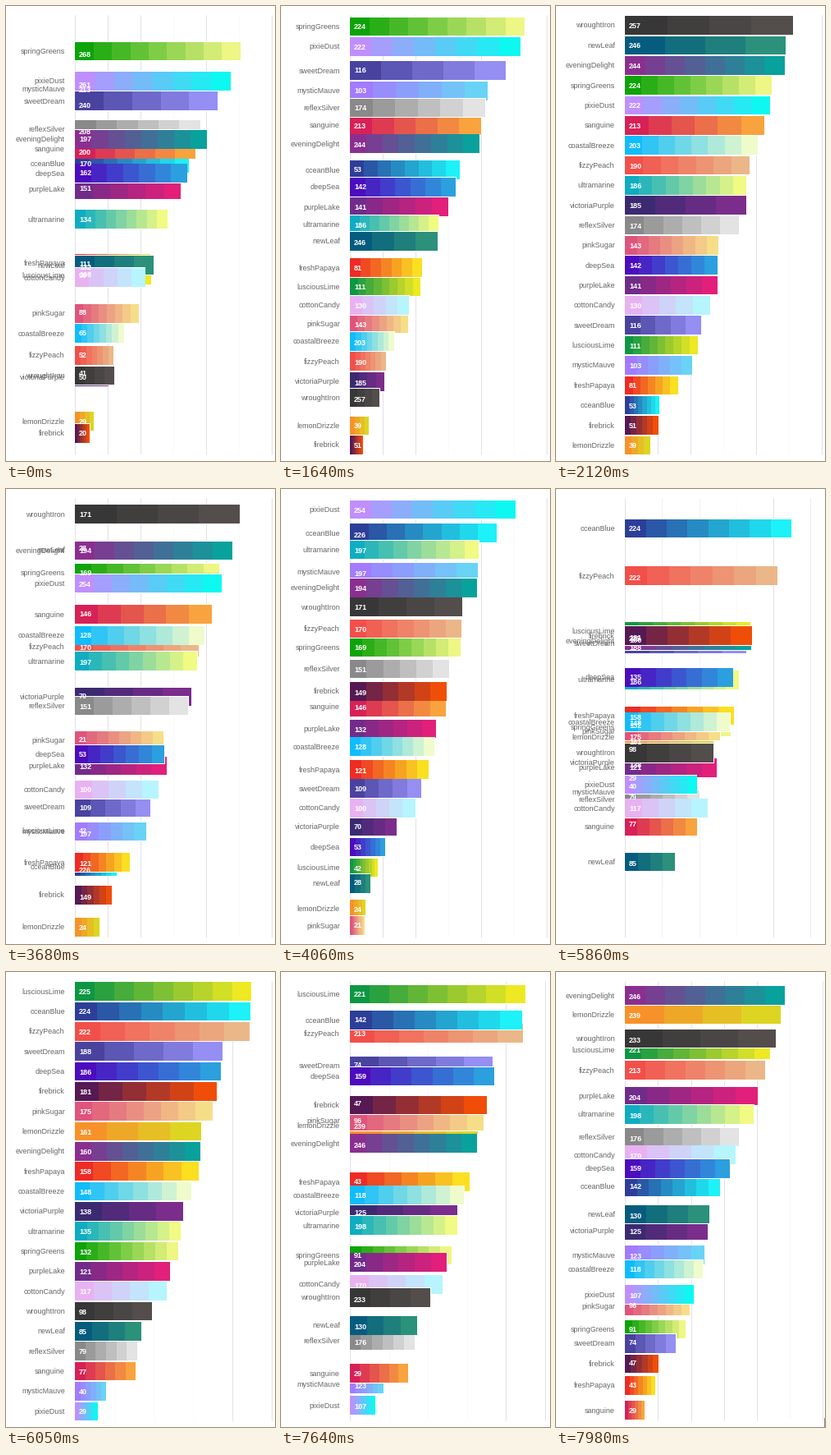
Animation, 328 px wide and 554 px high, one loop 8 s. Source, as a matplotlib script:

```python
import matplotlib.pyplot as plt
import numpy as np
from matplotlib.animation import FuncAnimation
from matplotlib.collections import LineCollection, PolyCollection
from matplotlib.colors import to_rgb

W, H, DPI = 328, 554, 64
PX = 72 / DPI                      # points per pixel
LOOP, TICK = 8000, 20
X0, SPAN = 84, 239.4               # left edge and width of the plot
ROW0, STEP, BAR = 23.5, 24.35, 22.6
EASE_MS, TEXT_LAG = 480, 5

# name: (start colour, end colour, bands, value in each round), back to front
BARS = {
    "victoriaPurple": ("#312a6c", "#852d91", 4, (70, 50, 185, 70, 138, 125)),
    "lemonDrizzle": ("#fb872b", "#d9e021", 4, (33, 29, 39, 24, 161, 239)),
    "springGreens": ("#009e00", "#fcfb8d", 9, (115, 268, 224, 169, 132, 91)),
    "pinkSugar": ("#dd4a7b", "#f8e88a", 8, (183, 88, 143, 21, 175, 96)),
    "lusciousLime": ("#009245", "#fcee21", 9, (195, 108, 111, 42, 225, 221)),
    "fizzyPeach": ("#f24645", "#ebc08d", 7, (126, 52, 190, 170, 222, 213)),
    "oceanBlue": ("#2e3192", "#1bffff", 8, (212, 170, 53, 226, 224, 142)),
    "mysticMauve": ("#a872ff", "#63dcf5", 6, (225, 213, 103, 197, 40, 123)),
    "freshPapaya": ("#ed1c24", "#fcee21", 7, (150, 111, 81, 121, 158, 43)),
    "sanguine": ("#d4145a", "#fbb03b", 6, (35, 200, 213, 146, 77, 29)),
    "reflexSilver": ("#808080", "#ececec", 6, (40, 208, 174, 151, 79, 176)),
    "purpleLake": ("#662d8c", "#ed1e79", 6, (262, 151, 141, 132, 121, 204)),
    "coastalBreeze": ("#00b7ff", "#ffffc7", 8, (171, 65, 203, 128, 148, 118)),
    "ultramarine": ("#00a8c5", "#ffff7e", 9, (206, 134, 186, 197, 135, 198)),
    "pixieDust": ("#cc88ff", "#00fff0", 8, (28, 261, 222, 254, 29, 107)),
    "sweetDream": ("#3f3a94", "#9f97fe", 5, (22, 240, 116, 109, 188, 74)),
    "newLeaf": ("#00537e", "#319a7a", 4, (18, 132, 246, 28, 85, 130)),
    "eveningDelight": ("#93278f", "#00a99d", 8, (245, 197, 244, 194, 160, 246)),
    "cottonCandy": ("#eeaaf0", "#b0fdff", 5, (265, 90, 130, 100, 117, 170)),
    "deepSea": ("#4f00bc", "#29abe2", 7, (255, 162, 142, 53, 186, 159)),
    "wroughtIron": ("#333333", "#585150", 4, (237, 41, 257, 171, 98, 233)),
    "firebrick": ("#45145a", "#ff5300", 6, (52, 20, 51, 149, 181, 47)),
}
COUNT = len(BARS)

# each change of round: first step, last step, number of steps, start of easing
CHANGES = [
    (0, 120, 3, -373),
    (1640, 2120, 10, 1592),
    (3680, 4140, 10, 3597),
    (5600, 6040, 10, 5563),
    (7580, 7980, 9, 7555),
]

values = np.array([bar[3] for bar in BARS.values()]).T
rows = np.argsort(np.argsort(-values, axis=1), axis=1)
centres = ROW0 + STEP * rows
scales = SPAN / np.array([300, 300, 300, 300, 250, 300])
widths = values * scales[:, None]

ticks = np.arange(0, 301, 50)
pale = 0.15
early = (1, 1, 1, pale, 1, pale, 1)
tick_alpha = np.array([early] * 4 + [(1, pale, pale, pale, 1, 1, 0),
                                     (1, 1, 1, 1, 1, pale, 1)])


def ease(u):
    u = min(max(u, 0), 1)
    return 2 * u * u if u < 0.5 else 1 - 2 * (1 - u) ** 2


def mix(table, k, p):
    return table[k] * (1 - p) + table[k + 1] * p


def progress(ms):
    """Index of the current change, and its eased part for bars and numbers."""
    k = max(i for i, change in enumerate(CHANGES) if ms >= change[0])
    first, last, steps, start = CHANGES[k]
    gap = (last - first) / (steps - 1)
    step = min(int((ms - first) / gap + 1e-6), steps - 1)
    spent = first + step * gap - start
    return k, ease(spent / EASE_MS), ease((spent - TEXT_LAG) / EASE_MS)


def box(left, right, top, bottom):
    return [(left, top), (right, top), (right, bottom), (left, bottom)]


def bar_boxes(width, y):
    boxes = []
    half = BAR / 2
    for (_, _, bands, _), w, c in zip(BARS.values(), width, y):
        boxes.append(box(X0, X0 + w + 0.8, c - half - 0.8, c + half + 0.8))
        edges = X0 + 0.4 + (w - 0.4) * np.arange(bands + 1) / bands
        for i in range(bands):
            right = min(edges[i + 1] + 0.5, edges[-1])
            boxes.append(box(edges[i], right, c - half, c + half))
    return np.array(boxes)


def bar_colours():
    colours = []
    for start, end, bands, _ in BARS.values():
        a, b = np.array(to_rgb(start)), np.array(to_rgb(end))
        colours.append((1, 1, 1))
        colours += [tuple(a + (b - a) * (i + 0.5) / bands) for i in range(bands)]
    return colours


fig = plt.figure(figsize=(W / DPI, H / DPI), dpi=DPI, facecolor="white")
ax = fig.add_axes([0, 0, 1, 1])
ax.set_xlim(0, W)
ax.set_ylim(H, 0)
ax.axis("off")

grid = LineCollection([], linewidths=PX, zorder=1)
ax.add_collection(grid, autolim=False)
bars = PolyCollection(bar_boxes(widths[0], centres[0]), facecolors=bar_colours(),
                      edgecolors="none", linewidths=0, zorder=2)
ax.add_collection(bars, autolim=False)

font = dict(family="Liberation Sans", size=9 * PX, va="baseline")
names = [ax.text(72, 0, name, ha="right", color="#666666", zorder=3, **font)
         for name in BARS]
numbers = [ax.text(89, 0, "", ha="left", color="white", weight="bold", zorder=4, **font)
           for _ in BARS]
caret, = ax.plot([326.5, 326.5], [543, 554], color="#8a8a8a", lw=PX, zorder=5)


def draw(frame):
    ms = frame * TICK
    k, p, p_text = progress(ms)
    y = mix(centres, k, p)
    y_text = mix(centres, k, p_text)
    bars.set_verts(bar_boxes(mix(widths, k, p), y))
    for i in range(COUNT):
        names[i].set_y(y[i] + 3)
        numbers[i].set_y(y_text[i] + 3.6)
        numbers[i].set_text(str(values[k + 1][i]))

    xs = X0 + 0.3 + ticks * mix(scales, k, p)
    grid.set_segments([[(x, 11), (x, 546)] for x in xs])
    grid.set_color([(0.88, 0.88, 0.92, a) for a in mix(tick_alpha, k, p)])
    caret.set_visible(ms >= CHANGES[-1][1])
    return [grid, bars, caret, *names, *numbers]


anim = FuncAnimation(fig, draw, frames=LOOP // TICK, interval=TICK,
                     repeat=True, repeat_delay=0, blit=False)
plt.show()
```
